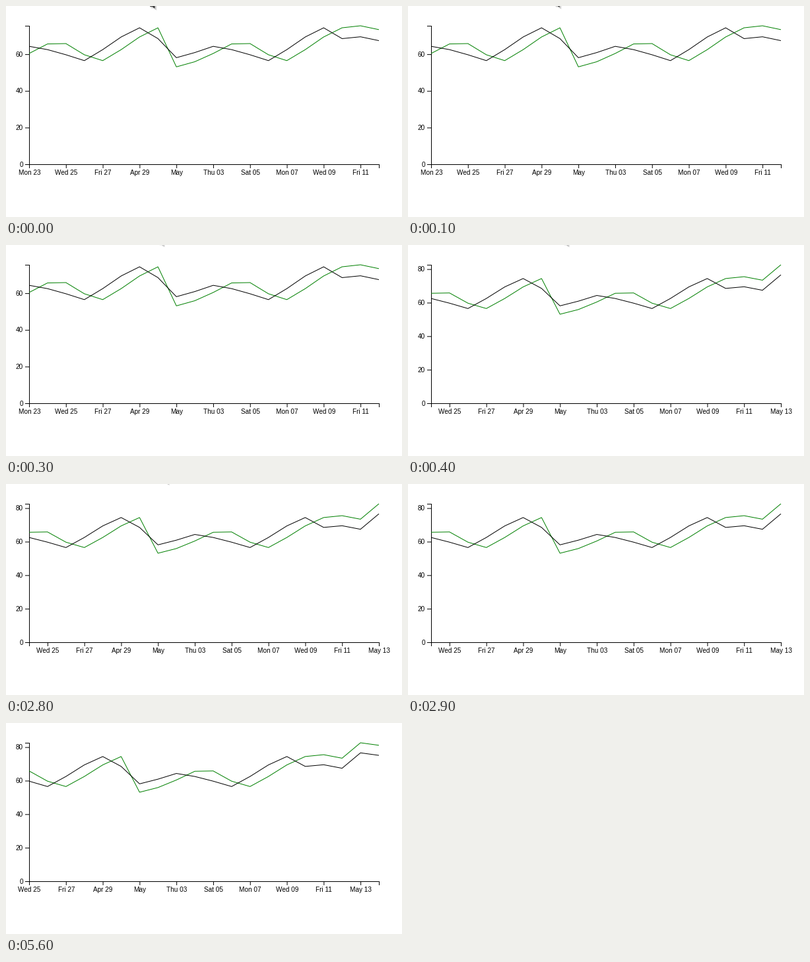
Animation, 600 px wide and 320 px high, one loop 8 s. Source, as a matplotlib script:

```python
import matplotlib.pyplot as plt
import numpy as np
from matplotlib.animation import FuncAnimation
from matplotlib.patches import Polygon, Rectangle

W, H, DPI = 600, 320, 100
INTERVAL, FRAMES = 100, 80
LEFT, TOP, RIGHT, BOTTOM = 35, 30, 565, 240
DAYS = 20
PX = 72 / DPI

plt.rcParams.update({
    "font.family": "Liberation Sans",
    "text.hinting": "force_autohint",
    "text.hinting_factor": 8,
})

# Temperatures repeat every ten days; the last four days break the cycle.
CYCLE = [64.3, 62.5, 59.7, 56.5, 62.5, 69.4, 74.4, 68.5, 58.1, 60.9]
WARM_SPELL = np.array([69.5, 67.4, 76.6, 75.1])
WEEKDAYS = "Mon Tue Wed Thu Fri Sat Sun".split()
TAIL = np.array([(0, 0), (-3.2, -1.6), (-4.2, -3), (-8, -3), (-8, -9), (0, -9)])

# Green follows black a day late, then drops five degrees below it.
green_cycle = [60.4, 65.6, 65.8] + CYCLE[2:7] + [t - 5 for t in CYCLE[8:]]
BLACK = np.append(np.resize(CYCLE, 18), WARM_SPELL)
GREEN = np.append(np.resize(green_cycle, 18), WARM_SPELL + 6)

fig = plt.figure(figsize=(W / DPI, H / DPI), dpi=DPI, facecolor="white")
ax = fig.add_axes([0, 0, 1, 1])


def bar(x, y, w, h):
    ax.add_patch(Rectangle((x, y), w, h, color="black", lw=0, snap=False))


def label(x, y, text, align):
    ax.text(x, y, text, size=10 * PX, ha=align, va="baseline")


def day_label(day):
    """Day 0 is Monday, April 23."""
    month, date = ("Apr", 23 + day) if day < 8 else ("May", day - 7)
    if date == 1:
        return month
    weekday = WEEKDAYS[day % 7]
    return f"{month if weekday == 'Sun' else weekday} {date:02d}"


def draw_axes(first, top_value):
    bar(LEFT, TOP, 1, BOTTOM - TOP + 1)
    bar(LEFT - 6, TOP, 6, 1)
    bar(LEFT, BOTTOM, RIGHT - LEFT + 1, 1)
    for x in (LEFT, RIGHT):
        bar(x, BOTTOM, 1, 6)
    for value in range(0, int(top_value) + 1, 20):
        y = BOTTOM - (BOTTOM - TOP) * value / top_value
        bar(LEFT - 6, y, 6, 1)
        label(LEFT - 9, y + 3.7, str(value), "right")
    for day in range(first + first % 2, first + DAYS, 2):
        x = LEFT + (RIGHT - LEFT) * (day - first) / (DAYS - 1)
        bar(x, BOTTOM, 1, 6)
        label(x + 0.5, BOTTOM + 16, day_label(day), "center")


def draw_series(values, top_value, color):
    x = np.linspace(LEFT, RIGHT, DAYS)
    y = BOTTOM - (BOTTOM - TOP) * values / top_value
    ax.plot(x, y, color=color, lw=PX, snap=False, solid_capstyle="butt",
            solid_joinstyle="miter")


def pointer_tip(time):
    """Glide along a shallow arc, rest, then slip off the top edge."""
    if time < 2800:
        step = min(time / 100, 4)
        return 226 + 4.1 * step, 1 + 0.33 * (step - 3.2) ** 2
    gone = min(time / 100 - 28, 1)
    return 245.5 + 12 * gone, -0.2 - 1.8 * gone


def draw_pointer(time):
    tip = np.array(pointer_tip(time))
    for shift in (2.4, 1.6, 0.8):
        ax.add_patch(Polygon(TAIL + tip + shift, color="black", alpha=0.1, lw=0))
    ax.add_patch(Polygon(TAIL + tip, fc="#3c3c3c", ec="white", lw=0.6 * PX))


def update(frame):
    time = frame * INTERVAL
    first = (time >= 400) + (time >= 5600)
    shown = slice(first, first + DAYS)
    top_value = GREEN[shown].max()
    ax.clear()
    ax.set(xlim=(0, W), ylim=(H, 0))
    ax.axis("off")
    draw_axes(first, top_value)
    draw_series(GREEN[shown], top_value, "green")
    draw_series(BLACK[shown], top_value, "black")
    if time < 5600:
        draw_pointer(time)
    return []


anim = FuncAnimation(fig, update, frames=FRAMES, interval=INTERVAL,
                     init_func=lambda: [], repeat=True, repeat_delay=0)
plt.show()
```
